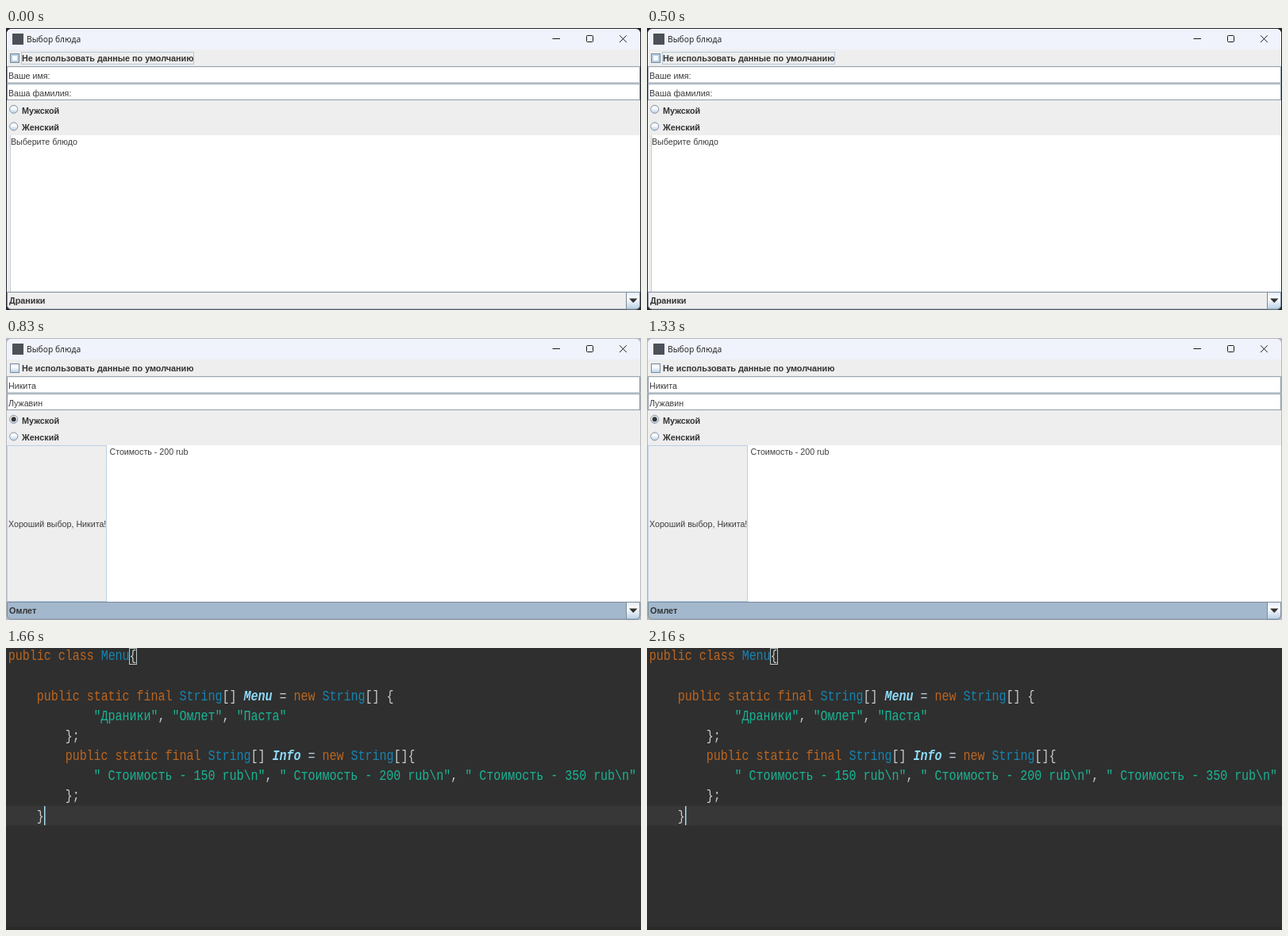
These frames come from a looping animation (800x355 px, 2490 ms). An HTML page:

```html
<!DOCTYPE html>
<html lang="ru">
<head>
<meta charset="utf-8">
<style>
  html, body { margin: 0; width: 100%; height: 100%; overflow: hidden; background: #2f2f2f; }
  svg { position: absolute; left: 0; top: 0; display: block; }
  text { white-space: pre; fill: #3c3c3c; font: 10.67px "Liberation Sans", Arial, sans-serif; }
  .bold { font-weight: bold; font-size: 10.8px; fill: #333; }
  .title { font: 10.3px "Open Sans", "Noto Sans", sans-serif; fill: #1b1b1b; }
  .code { font: 15px "Liberation Mono", "Courier New", monospace; fill: #c3cdd8; }
  .key { fill: #bd6620; }
  .type { fill: #1685b2; }
  .str { fill: #19b595; }
  .field { fill: #8ddaf8; font-weight: bold; font-style: italic; }
  .brace { fill: #c9cdca; }
</style>
</head>
<body>
<svg id="stage" width="800" height="355" viewBox="0 0 800 355">
  <defs>
    <linearGradient id="metal" x2="0" y2="1">
      <stop offset="0" stop-color="#dde8f3"/>
      <stop offset=".35" stop-color="#fff"/>
      <stop offset="1" stop-color="#b8cfe5"/>
    </linearGradient>
  </defs>
</svg>
<script>
const LOOP = 2490, STEP = 830;
const stage = document.getElementById('stage');

const rect = (x, y, w, h, fill, extra = '') =>
  `<rect x="${x}" y="${y}" width="${w}" height="${h}" fill="${fill}" ${extra}/>`;
const frame = (x, y, w, h, fill, line) =>
  rect(x + .5, y + .5, w - 1, h - 1, fill, `stroke="${line}"`);
const text = (x, y, s, cls = '') => `<text x="${x}" y="${y}" class="${cls}">${s}</text>`;
const path = (d, color, width = 1) =>
  `<path d="${d}" fill="none" stroke="${color}" stroke-width="${width}"/>`;

const field = (y, s) =>
  rect(1, y, 798, 21.6, '#fff') +
  rect(1.5, y + .5, 797, 20.3, '#fff', 'stroke="#7a8a99" stroke-width=".9"') +
  text(3, y + 15.8, s);

const radio = (y, s, on) =>
  `<circle cx="9.700" cy="${y}" r="5" fill="url(#metal)" stroke="#7a8a99" stroke-width=".9"/>` +
  (on ? `<circle cx="9.700" cy="${y}" r="3" fill="#333"/>` : '') +
  text(20, y + 5.5, s, 'bold');

function dialog(o) {
  const box = o.focus
    ? frame(5, 32, 12, 12, '#b8cfe5', '#7a8a99') + rect(8, 35, 6, 6, '#f7fafd') +
      frame(19, 30, 218, 16, 'none', '#b4c8dc')
    : frame(5, 32, 12, 12, 'url(#metal)', '#7a8a99');
  const side = o.split
    ? frame(1, 135, 126, 197, '#eee', '#b8cfe5') + text(3, 238, o.reply)
    : path('M5.5 135V332', '#c6ccd2');
  return rect(0, 0, 800, 355, o.back) +
    rect(1, 1, 798, 353, '#eee', 'rx="6"') +
    '<path d="M1 27V7a6 6 0 0 1 6-6H793a6 6 0 0 1 6 6V27z" fill="#f0f3fb"/>' +
    rect(8, 7, 14, 14, '#4c5058') +
    text(26, 17.7, 'Выбор блюда', 'title') +
    path('M688.5 13.5H698', '#1a1a1a') +
    rect(731.5, 9.5, 8, 8, 'none', 'rx="1" stroke="#1a1a1a"') +
    path('M773 9.3l8.800 8.800M781.800 9.3l-8.800 8.800', '#1a1a1a') +
    box + text(20, 42.4, 'Не использовать данные по умолчанию', 'bold') +
    field(48.2, o.first) + field(69.8, o.last) +
    radio(102.3, 'Мужской', o.male) + radio(123.9, 'Женский', false) +
    rect(o.split ? 127 : 6, 135, o.split ? 672 : 793, 197, '#fff') + side +
    text(o.split ? 127.5 : 6, 147, o.note) +
    `<path d="M1.5 332.5H798.5V349a5 5 0 0 1-5 5H6.5a5 5 0 0 1-5-5z" fill="${o.combo}" stroke="#7a8a99"/>` +
    '<path d="M781.5 332.5H798.5V349a5 5 0 0 1-5 5H781.5z" fill="url(#metal)" stroke="#7a8a99"/>' +
    '<path d="M785 340.5h10.5l-5.25 5.5z" fill="#333"/>' +
    text(4, 347, o.dish, 'bold');
}

const lines = [
  'public class Menu{',
  '',
  '    public static final String[] Menu = new String[] {',
  '            "Драники", "Омлет", "Паста"',
  '        };',
  '        public static final String[] Info = new String[]{',
  '            " Стоимость - 150 rub\\n", " Стоимость - 200 rub\\n", " Стоимость - 350 rub\\n"',
  '        };',
  '    }'
];
const token = /("[^"]*")|\b(public|class|static|final|new)\b|(?<=\] )(Menu|Info)|\b(String|Menu)\b|([{}\[\]])/g;
const kinds = ['str', 'key', 'field', 'type', 'brace'];
const paint = s => s.replace(token, (m, ...groups) =>
  `<tspan class="${kinds[groups.findIndex(g => g !== undefined)]}">${m}</tspan>`);

function editor() {
  const rows = lines.map((s, i) =>
    `<g transform="translate(2.700 ${15.3 + i * 25.15}) scale(1 1.23)">${text(0, 0, paint(s), 'code')}</g>`);
  return rect(0, 0, 800, 355, '#2f2f2f') +
    rect(0, 198.5, 800, 25, '#373737') +
    rect(0, 351, 800, 4, '#2a292a') +
    rows.join('') +
    frame(155, 0, 10, 21, 'none', '#b9c8c8') +
    rect(48, 199, 1.5, 24, '#a8dcf0');
}

const scenes = [
  dialog({
    back: '#25272b', focus: true, first: 'Ваше имя:', last: 'Ваша фамилия:',
    note: 'Выберите блюдо', combo: '#eee', dish: 'Драники'
  }),
  dialog({
    back: '#b4b7bd', split: true, male: true, first: 'Никита', last: 'Лужавин',
    reply: 'Хороший выбор, Никита!', note: ' Стоимость - 200 rub',
    combo: '#a3b8cc', dish: 'Омлет'
  }),
  editor()
];

scenes.forEach((markup, i) => {
  const g = document.createElementNS('http://www.w3.org/2000/svg', 'g');
  g.innerHTML = markup;
  stage.append(g);
  const steps = [0, 1, 2, 3].map(n => ({
    opacity: +(n % 3 === i), offset: n * STEP / LOOP, easing: 'step-end'
  }));
  g.animate(steps, { duration: LOOP, iterations: Infinity }).startTime = 0;
});
</script>
</body>
</html>
```
